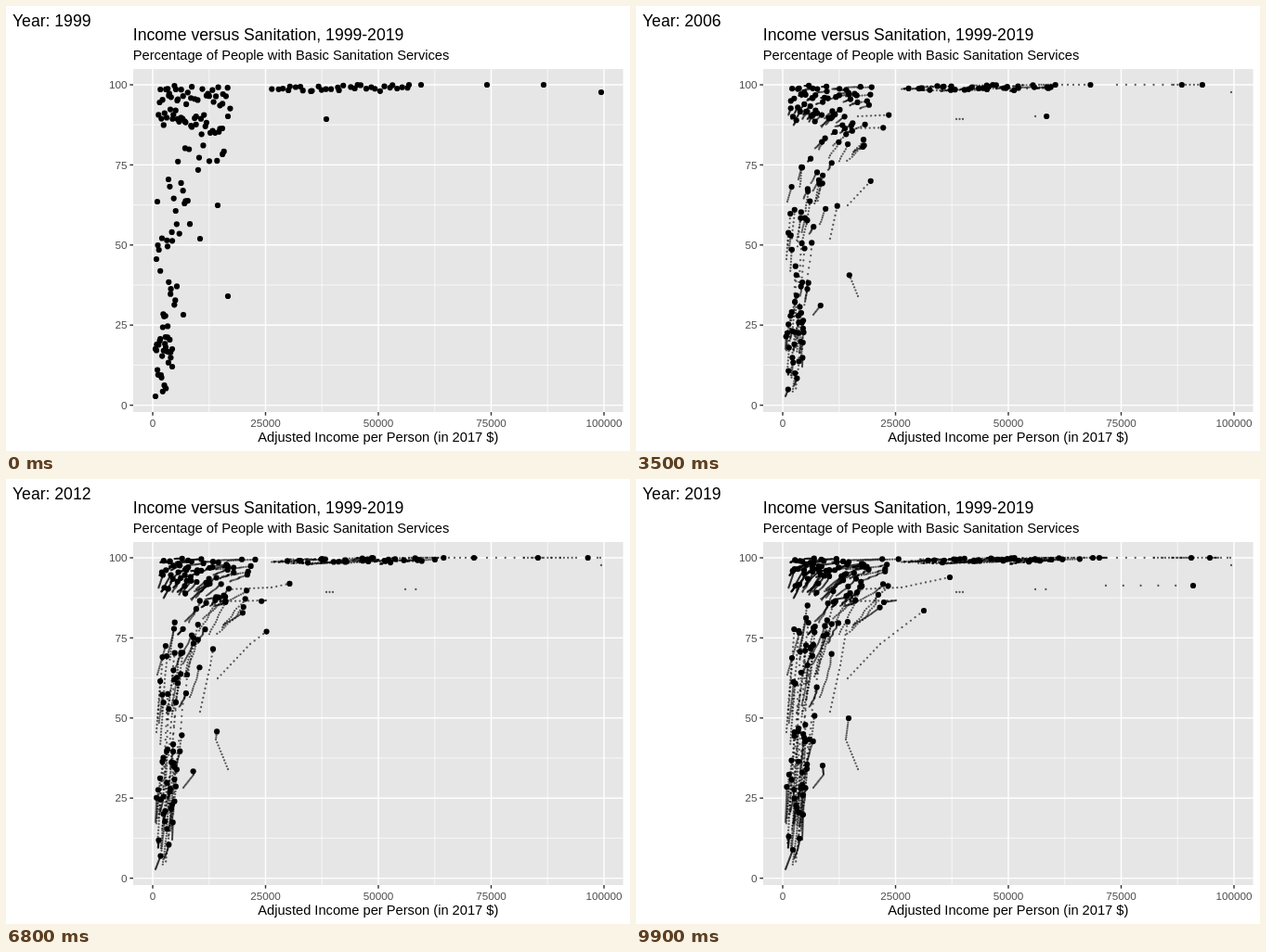
These frames come from a looping animation (672 px wide and 480 px high, 10000 ms). An HTML page with a canvas:

```html
<!DOCTYPE html>
<html lang="en">
<head>
<meta charset="utf-8">
<title>Income versus Sanitation</title>
<style>
  html, body { margin: 0; width: 100%; height: 100%; overflow: hidden; background: #fff; }
  svg, canvas { position: absolute; left: 0; top: 0; width: 672px; height: 480px; }
  text { font-family: "Liberation Sans", Arial, sans-serif; font-size: 14.67px; }
  .big { font-size: 17.6px; }
  .tick { font-size: 11.73px; fill: #4d4d4d; }
</style>
</head>
<body>
<svg viewBox="0 0 672 480">
  <rect x="137" y="68" width="527.6" height="370" fill="#e6e6e6"/>
  <g id="axes"></g>
  <text class="big" id="year" x="7" y="22">Year: 1999</text>
  <text class="big" x="136.8" y="37">Income versus Sanitation, 1999-2019</text>
  <text x="136.8" y="58">Percentage of People with Basic Sanitation Services</text>
  <text x="400.8" y="470" text-anchor="middle">Adjusted Income per Person (in 2017 $)</text>
</svg>
<canvas id="plot" width="672" height="480"></canvas>
<script>
const FIRST = 1999, LAST = 2019, FRAMES = 100, STEP = 100;
const LEFT = 158, TOP = 85;

// Axes: grid lines, ticks and labels
const axes = document.getElementById('axes');
function add(name, attrs, label = '') {
  const el = document.createElementNS('http://www.w3.org/2000/svg', name);
  for (const key in attrs) el.setAttribute(key, attrs[key]);
  el.textContent = label;
  axes.append(el);
}
const line = (d, stroke, width) => add('path', { d, stroke, 'stroke-width': width });
const gridX = i => LEFT + 121.5 * i;
const gridY = i => 430.6 - 86.4 * i;
for (let i = 0.5; i < 4; i++) {
  line(`M${gridX(i)} 68V438`, '#fff', 0.71);
  line(`M137 ${gridY(i)}H664.6`, '#fff', 0.71);
}
for (let i = 0; i < 5; i++) {
  const x = gridX(i), y = gridY(i);
  line(`M${x} 68V438`, '#fff', 1.42);
  line(`M137 ${y}H664.6`, '#fff', 1.42);
  line(`M${x} 438V441.7`, '#333', 1.42);
  line(`M133.3 ${y}H137`, '#333', 1.42);
  add('text', { class: 'tick', x, y: 453.5, 'text-anchor': 'middle' }, i * 25000);
  add('text', { class: 'tick', x: 130.5, y: y + 4.2, 'text-anchor': 'end' }, i * 25);
}

let seed = 11;
function random() {
  seed = (seed * 16807) % 2147483647;
  return seed / 2147483647;
}
const mix = (a, b, p) => a + (b - a) * p;

// Passes through evenly spaced points between two years
function course(from, to, points) {
  const at = year => {
    const p = (year - from) / (to - from) * (points.length - 1);
    const i = Math.min(Math.floor(p), points.length - 2);
    const [a, b] = [points[i], points[i + 1]];
    return [mix(a[0], b[0], p - i), mix(a[1], b[1], p - i)];
  };
  return { from, to, at };
}

// Steady growth with a small economic swing that vanishes at both ends
function trend(x0, y0) {
  const luck = random();
  const x1 = x0 + Math.min(0.6 * (x0 - 150), 60) * mix(luck, random(), 0.4);
  const reach = y0 > 340 ? 0.35 : 0.65;
  const y1 = mix(y0, TOP, reach * (0.1 + 0.9 * luck));
  const swing = 0.1 * random() - 0.03;
  const ripple = 0.03 * random() - 0.015;
  const at = year => {
    const p = (year - FIRST) / (LAST - FIRST);
    const drift = swing * Math.sin(Math.PI * p) + ripple * Math.sin(6 * Math.PI * p);
    const x = mix(x0, x1, p);
    return [x + (x - LEFT) * drift, mix(y0, y1, p)];
  };
  return { from: FIRST, to: LAST, at };
}

// Groups of countries: count, x range, y range in the first year
const groups = [
  [26, 161, 178, 345, 416],
  [16, 163, 184, 250, 335],
  [13, 174, 199, 187, 250],
  [26, 183, 236, 120, 178],
  [22, 164, 187, 85, 132],
  [26, 187, 242, 86, 130],
  [31, 285, 435, 85, 92]
];

// Countries away from the crowd, over the whole period
const loners = [
  [[239, 313], [226, 281], [229, 258]],
  [[191, 333], [202, 319], [201, 309]],
  [[228, 215], [263, 178], [310, 142]],
  [[209, 251], [220, 201], [228, 154]],
  [[239, 119], [286, 117], [338, 106]],
  [[233, 132], [280, 131], [267, 133]],
  [[172, 368], [188, 183]],
  [[162, 273], [168, 193]],
  [[163, 211], [176, 166]],
  [[179, 389], [180, 362]],
  [[179, 370], [182, 283]],
  [[161, 421], [169, 400]]
];

// Richest countries, nearly level: first year, last year, y, then x
const richest = [
  [1999, 2019, 85, 447, 507, 499],
  [1999, 2019, 85, 434, 459, 492],
  [1999, 2007, 85, 579, 614],
  [2010, 2013, 85, 640, 625, 637, 623],
  [2015, 2019, 85, 630, 618],
  [1999, 2007, 85, 518, 597],
  [2009, 2019, 85, 558, 598],
  [1999, 1999.9, 93, 641, 640],
  [1999, 2001, 122, 345, 352],
  [2005, 2006.5, 119, 430, 447],
  [2014, 2019, 115, 506, 600]
];

const tracks = [];
for (const [count, xMin, xMax, yMin, yMax] of groups)
  for (let i = 0; i < count; i++) {
    const x = mix(xMin, xMax, (i + random()) / count);
    tracks.push(trend(x, mix(yMin, yMax, random() ** 1.3)));
  }
for (const points of loners) tracks.push(course(FIRST, LAST, points));
for (const [from, to, y, ...xs] of richest)
  tracks.push(course(from, to, xs.map(x => [x, y])));

const ctx = document.getElementById('plot').getContext('2d');
const yearLabel = document.getElementById('year');

function dot([x, y], radius) {
  ctx.beginPath();
  ctx.arc(x, y, radius, 0, 2 * Math.PI);
  ctx.fill();
}

function draw(frame) {
  const now = mix(FIRST, LAST, frame / (FRAMES - 1));
  yearLabel.textContent = 'Year: ' + Math.floor(now + 1e-6);
  ctx.clearRect(0, 0, 672, 480);
  ctx.fillStyle = 'rgba(0, 0, 0, 0.62)';
  for (const { from, to, at } of tracks)
    for (let year = from; year < now - 1e-6 && year <= to; year++) dot(at(year), 1.15);
  ctx.fillStyle = '#000';
  for (const { from, to, at } of tracks)
    if (now >= from && now <= to + 1e-6) dot(at(now), 3.1);
}

const start = performance.now();
let shown = -1;
function tick() {
  const frame = Math.floor(Math.max(0, performance.now() - start) / STEP) % FRAMES;
  if (frame !== shown) draw(shown = frame);
  requestAnimationFrame(tick);
}
tick();
</script>
</body>
</html>
```
